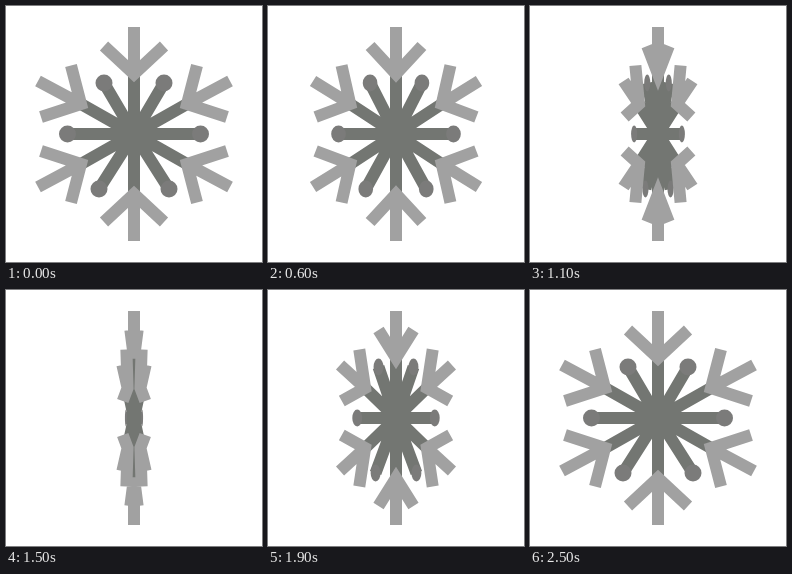
An HTML page that plays this animation: 256x256 px, repeating every 2.8 s.

```html
<!DOCTYPE html>
<html lang="en">
<head>
<meta charset="utf-8">
<title>Turning snowflake</title>
<style>
  html, body { margin: 0; height: 100%; overflow: hidden; background: #fff; }
  svg { display: block; width: 100%; height: 100%; }
  path { fill: none; stroke-width: 12; stroke-miterlimit: 4; }
</style>
</head>
<body>
<svg viewBox="-128 -128 256 256">
  <path id="spokes" stroke="#737672"/>
  <g id="dots" fill="#7b7b7a"></g>
  <path id="branches" stroke="#a1a1a1"/>
</svg>
<script>
const LOOP = 2800, STEP = 100, START = 300, END = 2500;
const DOT_RADIUS = 8.5;

const mirrorX = line => line.map(([x, y]) => [-x, y]);
const mirrorY = line => line.map(([x, y]) => [x, -y]);
const withMirrors = (lines, mirror) => [...lines, ...lines.map(mirror)];

const upright = [
  [[0, -107], [0, -68]],
  [[-30, -88], [0, -68 + 8], [30, -88]].map(([x, y]) => [x, y === -60 ? -68 + 0 : y])
];
upright[1] = [[-30, -88], [0, -60], [30, -88]];
const side = [
  [[-96, -53], [-53, -30]],
  [[-63, -68.5], [-53, -30], [-93, -17]]
];
const branches = withMirrors([...upright, ...withMirrors(side, mirrorX)], mirrorY);

const dots = [[-66.5, 0], [66.5, 0], [-30, -51], [30, -51], [-35, 55], [35, 55]];
const spokeEnds = [...dots, [0, -62], [0, 62],
  [-53, -30], [53, -30], [-53, 30], [53, 30]];
const spokes = spokeEnds.map(end => [[0, 0], end]);

const byId = id => document.getElementById(id);
const dotNodes = dots.map(([, y]) => {
  const node = document.createElementNS(byId("dots").namespaceURI, "ellipse");
  node.setAttribute("cy", y);
  node.setAttribute("ry", DOT_RADIUS);
  return byId("dots").appendChild(node);
});

// Cubic-bezier(.25, 0, .75, 1), solved by bisection.
function ease(t) {
  let low = 0, high = 1;
  for (let i = 0; i < 30; i++) {
    const u = (low + high) / 2;
    if (.75 * u + .75 * u * u - .5 * u ** 3 < t) low = u; else high = u;
  }
  return low * low * (3 - 2 * low);
}

// Only the coordinates are squeezed, so strokes keep their width.
const pathData = (lines, scale) => lines.map(line =>
  "M" + line.map(([x, y]) => `${(x * scale).toFixed(3)},${y}`).join("L")).join("");

function draw(now) {
  const time = Math.floor(now % LOOP / STEP) * STEP;
  const progress = Math.min(1, Math.max(0, (time - START) / (END - START)));
  const scale = 1 - 2 * ease(progress);
  byId("spokes").setAttribute("d", pathData(spokes, scale));
  byId("branches").setAttribute("d", pathData(branches, scale));
  dotNodes.forEach((node, i) => {
    node.setAttribute("cx", dots[i][0] * scale);
    node.setAttribute("rx", DOT_RADIUS * Math.abs(scale));
  });
}

function tick() {
  draw(performance.now());
  requestAnimationFrame(tick);
}
tick();
</script>
</body>
</html>
```
